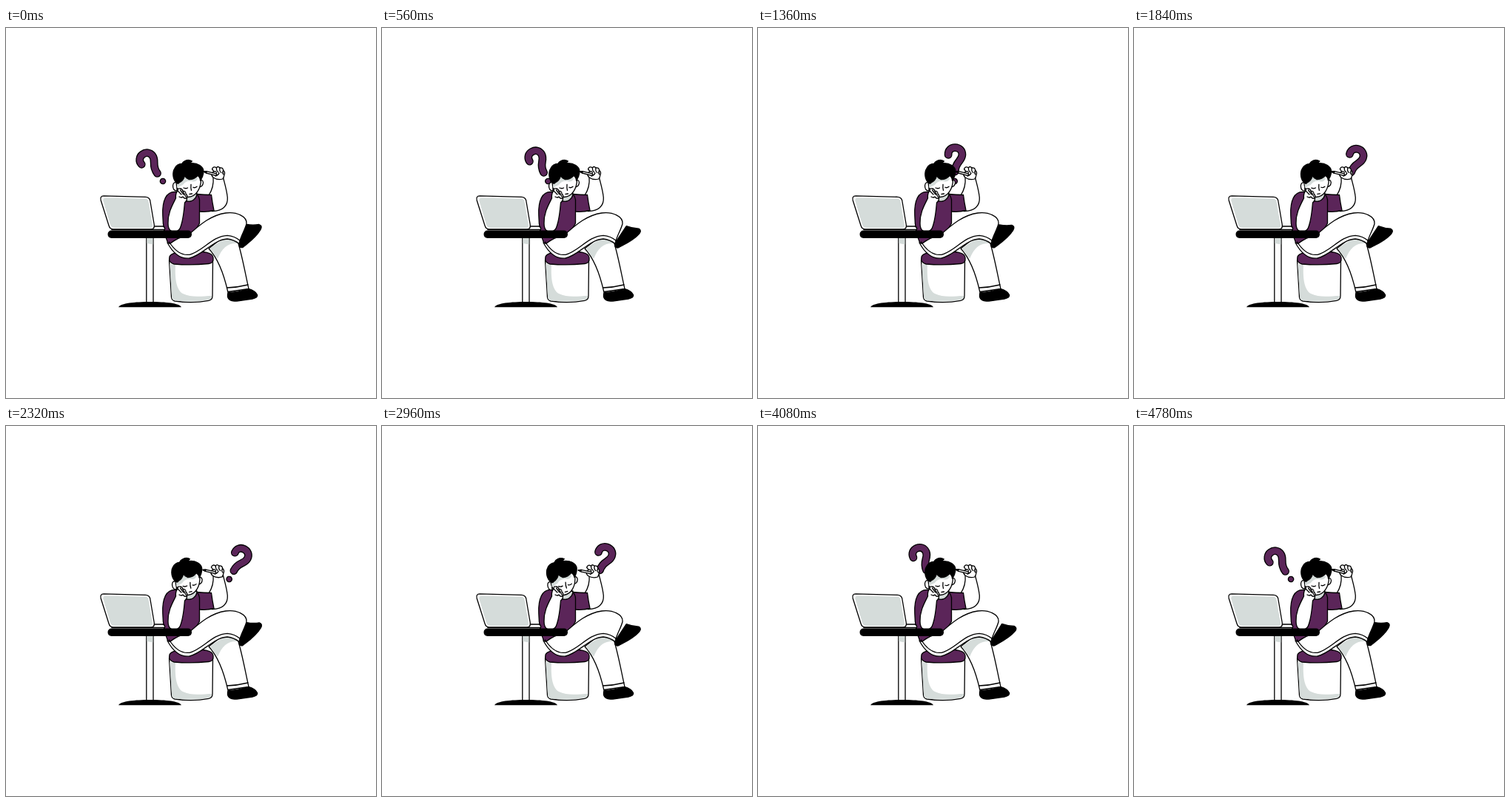
Recreate the animation shown at these times as an HTML page. Size 500 by 500 pixels, loop 4.82 s.

```html
<!DOCTYPE html>
<html lang="en">
<head>
<meta charset="utf-8">
<title>Thinking at the desk</title>
<style>
html, body { margin: 0; width: 100%; height: 100%; overflow: hidden; background: #fff; }
svg { display: block; width: 100%; height: 100%; }
.art { stroke: #000; stroke-width: 1.3; stroke-linecap: round; stroke-linejoin: round; fill: none; }
.w { fill: #fff; }
.p { fill: #5b2559; }
.g { fill: #d5dcda; }
.k { fill: #000; }
.flat { stroke: none; }
.rim { stroke-width: 10.8; }
.core { stroke: #5b2559; stroke-width: 8.2; }
</style>
</head>
<body>
<svg viewBox="0 0 500 500">
<defs>
  <path id="hook" d="M-9.300-35.500C-9.800-41.500-5.500-45.400-.3-45.400C5.500-45.400 9.500-41.500 9.500-36C9.500-27 .2-26.500 .4-13"/>
</defs>
<g class="art">
  <g id="mark">
    <use href="#hook" class="rim"/>
    <use href="#hook" class="core"/>
    <circle class="p" r="3.700"/>
  </g>

  <g id="stool">
    <path class="w" d="M220.500 314L223.500 364Q224 368 228 369Q252 372.500 274 368.300Q279 367.300 279 362L279.500 314Z"/>
    <path class="g flat" d="M221.300 319L229 320C228 338 230 354 239 359C251 365 266 362 278 362Q278 367 274 367.300Q252 371.600 228 368.300Q224.500 367.500 224.100 364Z"/>
    <path class="p" d="M221 309C223 304 232 302 249 302C268 302 279 303 280 310Q281 318 274 318.500Q250 321 227 319Q219 317 221 309Z"/>
  </g>

  <g id="rear-leg">
    <path class="w" d="M274 298C287 312 295 335 299.800 356.500L328 352.500C323 330 319 307 313 288L297 280Z"/>
    <path class="g flat" d="M275.500 298.500C284 291 295 283 307 285L313 291C300 290 292 297 286 312Z"/>
    <path d="M298.700 351Q313 350.500 327 347"/>
    <path class="k" d="M300 357.500C298 365 301 370 312 369L333 366Q341 364.500 339.500 360.500Q337 355 327.500 352.500Q313 357 300 357.500Z"/>
  </g>

  <path id="shoe" class="k" d="M325 265.500Q334 267 342 265.500Q347 267 344 272.500C338 283 328 290 320 296.500Q313.500 298 315.500 289Z"/>

  <g id="arm">
    <path class="w" d="M278 247.500C293 248 300 240 299.300 229C298 217 295 209 293 200L280 201C281 212 278 220 274 226Z"/>
    <g id="grip">
      <path class="w" d="M280 202C276 198 278 195 281 194L278.500 190.500Q280.500 186 284.500 189Q286 186 289 189Q293 188 293.800 192.500Q296.500 195 295 198.500Q294.500 202 292.800 204Q286 206 280 202Z"/>
      <path class="w" d="M267 194L271 193.600L284 196.800Q286 199 283 199.300L270.500 196Z"/>
      <path class="k" d="M267 194L271 193.600L270.500 196Z"/>
      <path d="M284.500 189Q284 193 287 195M289 189Q288 194 291 195.500M293.500 192.500Q292 196 294 198M281 194Q284 193 284.500 196M283 200Q287 199 288 196"/>
    </g>
  </g>

  <g id="shirt">
    <path class="p" d="M258 224.500Q268 225.500 277.500 225.500Q279 237 281 246.500Q272 249 262 248L255 235Z"/>
    <path class="p" d="M230 221.500C216 220 211 234 211.800 253C212 268 214 280 219 291L246 290L261.500 264V235Q262 228 257 224Z"/>
    <path class="g" d="M236 225Q240 236 250 234Q258 231 258 223Z"/>
  </g>

  <g id="front-leg">
    <path class="w" d="M218 290C226 305 236 312.500 248 311C266 307 280 286 299 285Q308 286 315 291.500C317 281 323 273 325 264.500C326 255 312 248 297 250C276 253 261 267 246 280Q234 282 221.500 291.500Z"/>
    <path d="M220.500 289C228 301 238 307.500 248 306.300C265 302.500 279 281 299 280.300Q309 281 316.500 287.500"/>
  </g>

  <g id="head">
    <path class="w" d="M231 209Q226 207.500 225.500 213Q225.500 220 231 220Z"/>
    <path class="w" d="M261 206Q266 204 266.500 209Q266 215 260 215Z"/>
    <path class="w" d="M230 203C229 217 235 228 246 228.500C257 228 263.500 217 263.500 204L260 194H234Z"/>
    <path class="g flat" d="M231 208L241 198H257L259 204Q256 209 251 207Q243 206 239 212L231 216Z"/>
    <path class="k" d="M231 209.500C225 205 224.500 195 228 189.500Q231 184 237.500 183.500C240 179 246 176.500 251.500 180Q249.500 181 249.500 182.800C259 182 267 187.500 267 194Q266.500 201 262.500 206Q262.500 202 259 199.500Q254 205 247 204.500Q243 203 241.500 199.500Q240 206 234 209Q232.500 211 231 209.500Z"/>
    <path d="M240 216Q243 217.500 245.500 216M253 215.300Q255.500 216.500 258 214.300M250 211.500Q249.500 216 250.500 219.500M248 224.500L251.500 224"/>
  </g>

  <g id="chin-arm">
    <path class="w" d="M219 264C218.500 250 225 239 229.500 230C229 225 230 222 232 220Q232 216 235 217Q238 217 239 220.500Q243 220 243 224Q245.500 226 244.500 229Q245 233 241.500 236C240.500 248 239.500 258 236.500 267C234 277 225 277 221.500 273Q219 270 219 264Z"/>
    <path d="M232 220L237 225M235.500 219L240 225M239 220.500L243 228M234 228Q237 230 239 228Q242 232 244.500 229"/>
  </g>

  <g id="desk">
    <path class="w" d="M189.800 282H199V372H189.800Z"/>
    <path class="g flat" d="M190.500 284H198.400V292.500L190.500 291Z"/>
    <path class="k flat" d="M152 377.300C155 372 174 370.100 195 370.100S234 372 237 377.300Z"/>
    <rect class="k flat" x="137.500" y="273.500" width="113.500" height="10.500" rx="5"/>
    <path class="w" d="M143 272.500V270L196 268H212Q215 268.500 214.500 272.500Z"/>
    <path class="w" d="M132 226.900L188.500 228.300Q193.700 228.500 194.700 233L200.300 266Q201 272 196 272H145Q140.500 272 139 267L128.200 233Q126.700 227 132 226.900Z"/>
    <path class="g flat" d="M135 229.500L188 230.500Q191.500 230.500 192.500 234L198 266Q198.500 270 195 270H147Q142.500 270 141 266L131.500 234Q130.500 229.500 135 229.500Z"/>
  </g>
</g>
</svg>
<script>
const LOOP = 4820;
const [mark, shoe, head, grip] =
  ['mark', 'shoe', 'head', 'grip'].map(id => document.getElementById(id));

const smooth = u => u * u * (3 - 2 * u);
// Eased 0 to 1 to 0, highest at peak, resting beyond half on either side.
const bump = (t, peak, half) => smooth(Math.max(0, 1 - Math.abs(t - peak) / half));
const turn = (el, deg, x, y) => el.setAttribute('transform', `rotate(${deg} ${x} ${y})`);

function draw(t) {
  const s = bump(t, LOOP / 2, LOOP / 2);
  mark.setAttribute('transform', `translate(${212 + 90 * s} 207) rotate(${-37 + 64 * s})`);

  const beat = LOOP / 4;
  turn(shoe, 12 * bump(t % beat, beat / 2, beat / 2), 317, 292);

  const lean = bump(t, 2900, 1300);
  turn(head, -6 * lean, 246, 230);
  turn(grip, -2 * lean, 292, 245);
}

function tick(now) {
  draw(now % LOOP);
  requestAnimationFrame(tick);
}
draw(0);
requestAnimationFrame(tick);
</script>
</body>
</html>
```
